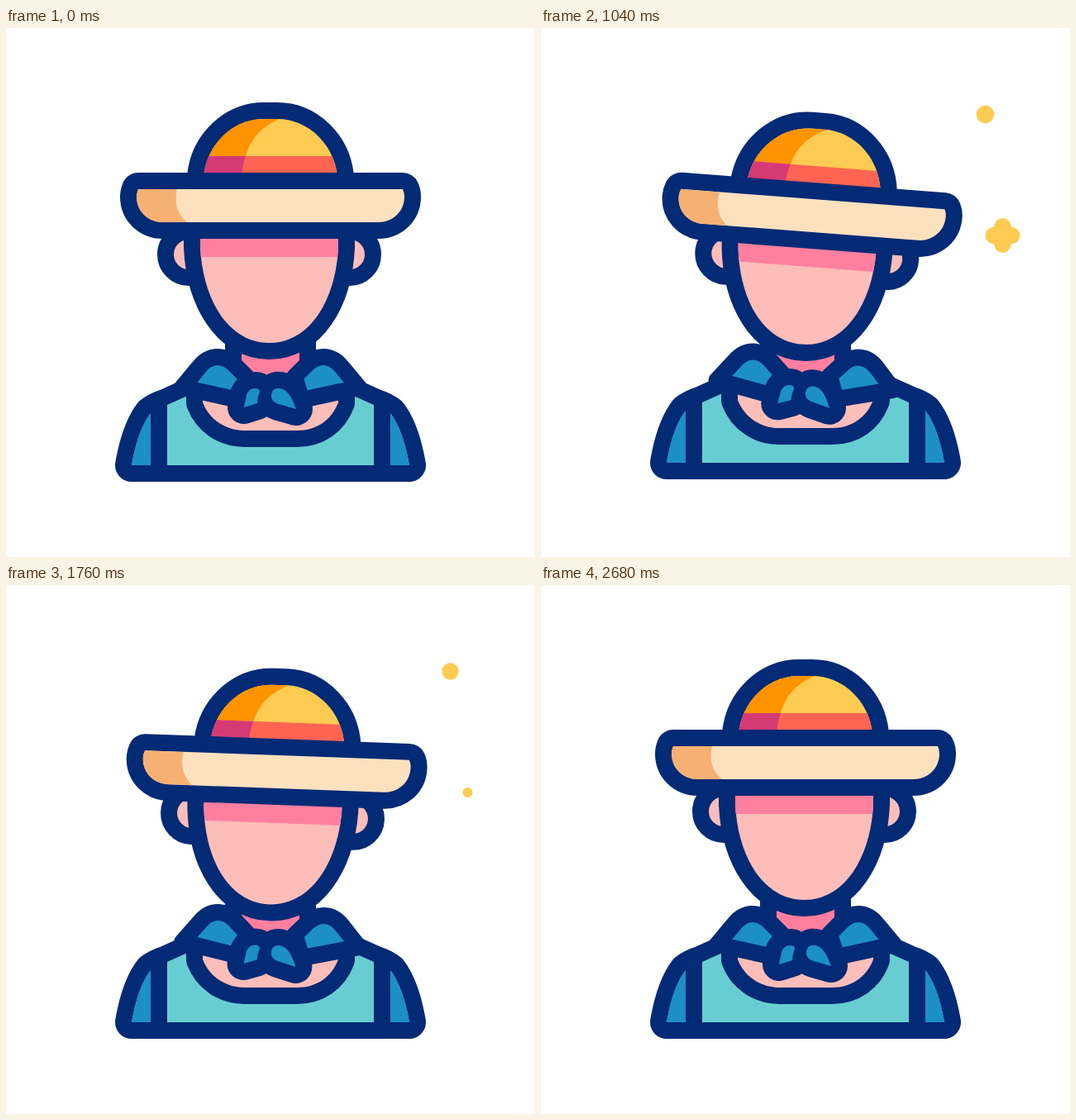
These frames come from a looping animation (640x640 px, 3000 ms). An HTML page:

```html
<!DOCTYPE html>
<html lang="en">
<head>
<meta charset="utf-8">
<title>Farmer with straw hat</title>
<style>
  html, body { margin: 0; width: 100%; height: 100%; overflow: hidden; background: #fff; }
  svg { display: block; width: 100vw; height: 100vh; }
  /* Outlines grow 20 units outwards; the fill covers the inner half. */
  .ink { stroke: #032a75; stroke-width: 40; stroke-linejoin: round; paint-order: stroke; }
  .wing { stroke: #032a75; stroke-width: 20; stroke-linejoin: round; }
  .star { fill: none; stroke: #fecb52; stroke-linejoin: round; stroke-linecap: round; }
  .skin { fill: #fdbdb9; }
  .sky { fill: #1c8fc5; }
  .teal { fill: #68cdd2; }
</style>
</head>
<body>
<svg viewBox="0 0 640 640">
  <defs>
    <path id="face" d="M235 235V265C238 330 270 381 318.5 381C367 381 399 330 402 265V235Z"/>
    <path id="crown" d="M239 180C243 140 275 110 312 110H328C365 110 397 140 401 180Z"/>
    <path id="brim" d="M160 195Q158 200 158 204C158 222 172 235 190 235H450C468 235 482 222 482 204Q482 199 480 195Z"/>
    <path id="wing" d="M213 435L233 411Q243 398 256 398Q267 398 276 407L291 422L282 450Z"/>
    <clipPath id="inFace"><use id="faceMask" href="#face"/></clipPath>
    <clipPath id="inCrown"><use href="#crown"/></clipPath>
    <clipPath id="inBrim"><use href="#brim"/></clipPath>
  </defs>

  <path class="star" id="starTop" transform="translate(537.5 104.5)"/>
  <path class="star" id="starLow" transform="translate(558.5 251)"/>

  <g id="body">
    <path class="ink teal" d="M152 529C157 500 165 479 175 466Q182 460 195 456L235 438H405L445 456Q458 460 465 466C475 479 483 500 488 529Z"/>
    <path class="sky" d="M152 529C157 500 165 479 175 466V529ZM488 529C483 500 475 479 465 466V529Z"/>
    <path d="M185 450V539M455 450V539" stroke="#032a75" stroke-width="20"/>
    <path class="ink skin" d="M238 442V453C246 474 266 487 288 487H352C376 487 394 474 402 453V442Z"/>
    <path class="ink" fill="#ff7f9f" d="M285 370H355V422H285Z"/>
  </g>

  <g id="scarf">
    <use class="wing sky" href="#wing"/>
    <use class="wing sky" href="#wing" transform="matrix(-1 0 0 1 640 0)"/>
    <path class="ink sky" d="M288 459L291 444Q294 436 301 436Q307 436 307 440Q304 447 304 454ZM321 445C321 438 326 435 332 436C341 438 346 447 351 461L330 455C324 453 321 450 321 445Z"/>
  </g>

  <g id="head">
    <circle class="ink skin" cx="221" cy="274" r="18"/>
    <circle class="ink skin" cx="416" cy="274" r="18"/>
    <use class="ink skin" href="#face"/>
  </g>
  <g clip-path="url(#inFace)">
    <rect id="shade" x="180" y="180" width="280" height="97" fill="#ff7f9f"/>
  </g>

  <g id="hat">
    <use class="ink" href="#crown" fill="#fecb52"/>
    <g clip-path="url(#inCrown)">
      <path fill="#ff9300" d="M230 155V100H331V110Q298 124 290 155Z"/>
      <path fill="#ff6452" d="M230 155H410V195H230Z"/>
      <path fill="#d63a76" d="M230 155H290Q286 166 285 180H230Z"/>
    </g>
    <use class="ink" href="#brim" fill="#fde1bf"/>
    <path clip-path="url(#inBrim)" fill="#f6b073" d="M150 190H208C203 208 205 224 220 236H150Z"/>
  </g>
</svg>
<script>
const LOOP = 3000, STEP = 40;
const $ = id => document.getElementById(id);

function ramp(t, from, to) {
  const u = Math.min(1, Math.max(0, (t - from) / (to - from)));
  return u * u * (3 - 2 * u);
}

// Rest, lean to the right, lean back to the left, overshoot, rest.
function swing(t, right, left, over = 0) {
  return right * ramp(t, 240, 680) + (left - right) * ramp(t, 760, 1280)
    + (over - left) * ramp(t, 1320, 1640) - over * ramp(t, 1880, 2480);
}

function place(ids, pivotY, turn, x, y) {
  for (const id of ids)
    $(id).setAttribute('transform', `translate(${x} ${y}) rotate(${turn} 320 ${pivotY})`);
}

function drawStar(id, radius) {
  const tip = Math.max(0, radius - 10), a = tip * 0.1, b = tip * 0.37;
  $(id).setAttribute('d', `M0 ${-tip}C${a} ${-b} ${b} ${-a} ${tip} 0C${b} ${a} ${a} ${b} 0 ${tip}` +
    `C${-a} ${b} ${-b} ${a} ${-tip} 0C${-b} ${-a} ${-a} ${-b} 0 ${-tip}Z`);
  $(id).style.strokeWidth = Math.min(20, 2 * radius);
}

function draw(now) {
  const t = Math.floor(now % LOOP / STEP) * STEP;
  // Each part follows the body a little later.
  const follow = (lag, ...reach) => swing(t - lag, ...reach);
  const bodyY = follow(0, 11, -14);

  place(['body'], 455, follow(0, 3.8, -3), 0, bodyY);
  place(['scarf'], 440, follow(90, 9.3, -11, 1.7), follow(0, 2, -3), bodyY);
  place(['head', 'faceMask'], 274,
    follow(30, 10.2, -7.5, 2), follow(30, 24, -20, 4), follow(30, 22, -20.5, 5.5));
  place(['hat', 'shade'], 195,
    follow(70, 12, -9.3, 2.1), follow(40, 38.5, -28.5, 8), follow(70, 32, -24, 11));

  drawStar('starTop', 65 * (ramp(t, 900, 1440) - ramp(t, 1520, 1840)));
  drawStar('starLow', 50 * (ramp(t, 880, 1240) - ramp(t, 1470, 1840)));
}

let start;
function frame(now) {
  start ??= now;
  draw(now - start);
  requestAnimationFrame(frame);
}
draw(0);
requestAnimationFrame(frame);
</script>
</body>
</html>
```
